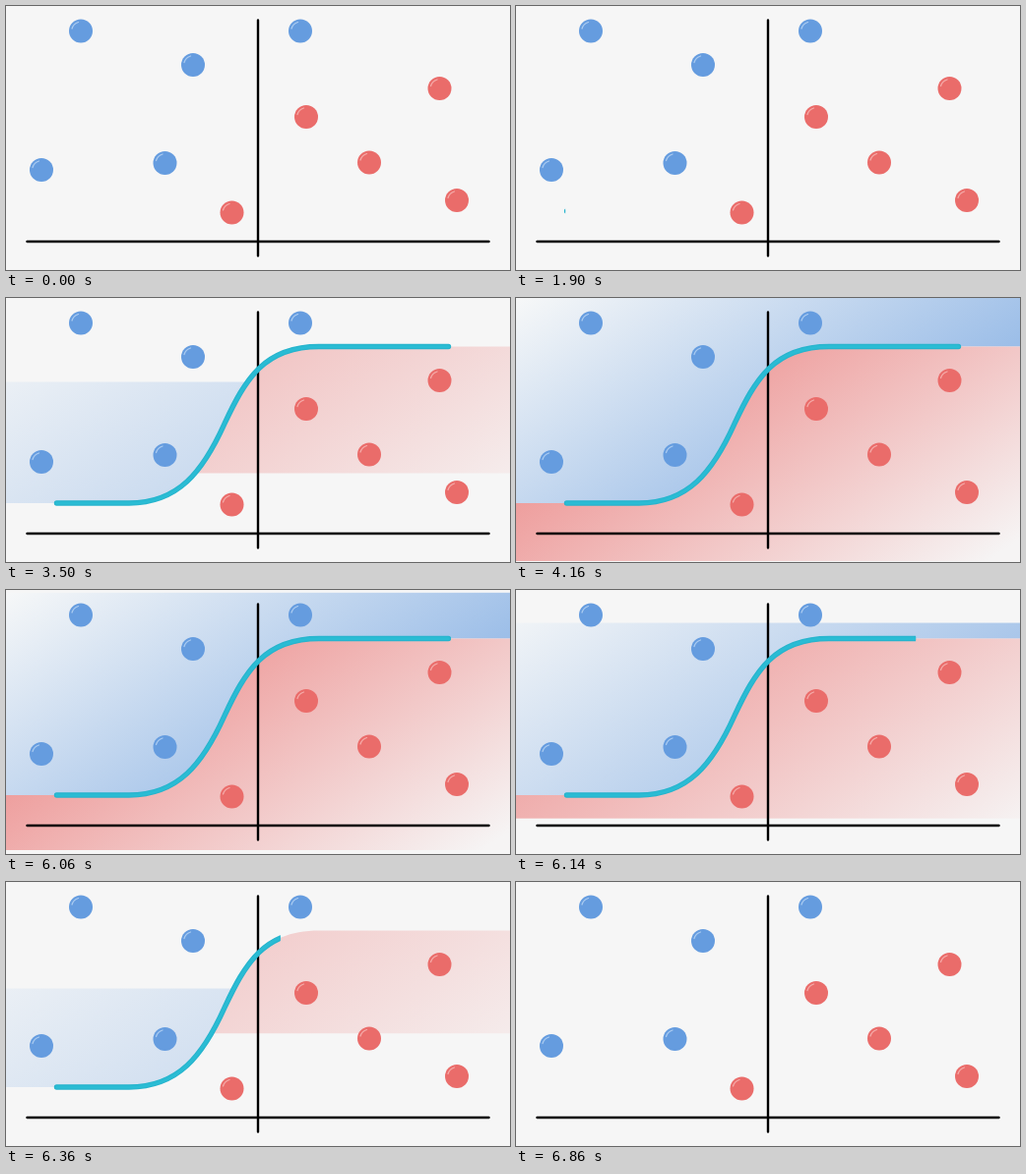
Animation, 512 px wide and 269 px high, one loop 9380 ms. Source, as an HTML page:

```html
<!DOCTYPE html>
<html lang="en">
<head>
<meta charset="utf-8">
<title>Decision boundary</title>
<style>
html, body { margin: 0; width: 100%; height: 100%; overflow: hidden; background: #f6f6f6; }
svg { display: block; width: 100%; height: 100%; }
</style>
</head>
<body>
<svg viewBox="0 0 512 269">
  <defs>
    <linearGradient id="blueFill" gradientUnits="userSpaceOnUse" x1="0" y1="0" x2="176" y2="266">
      <stop offset="0" stop-color="#f7f8f8"/>
      <stop offset="1" stop-color="#9cbee8"/>
    </linearGradient>
    <linearGradient id="redFill" gradientUnits="userSpaceOnUse" x1="93.5" y1="141" x2="270" y2="407">
      <stop offset="0" stop-color="#ee9d9c"/>
      <stop offset="1" stop-color="#f6f4f4"/>
    </linearGradient>
    <clipPath id="blueClip"><rect id="blueWipe" width="512"/></clipPath>
    <clipPath id="redClip"><rect id="redWipe" y="49" width="512"/></clipPath>
    <clipPath id="lineClip"><rect id="lineWipe" x="48" y="40" height="180"/></clipPath>
  </defs>
  <rect width="512" height="269" fill="#f6f6f6"/>
  <g clip-path="url(#blueClip)"><path id="blue" fill="url(#blueFill)"/></g>
  <g clip-path="url(#redClip)"><path id="red" fill="url(#redFill)"/></g>
  <path d="M256 14.5V254.5M21.5 240H490.5" stroke="#000" stroke-width="2.4" stroke-linecap="round"/>
  <g clip-path="url(#lineClip)" fill="none" stroke-linecap="round">
    <path class="line" stroke="#27b4cd" stroke-width="5.4"/>
    <path class="line" stroke="#2abcd4" stroke-width="3"/>
  </g>
  <g id="dots"></g>
</svg>
<script>
const LOOP = 9380, TOP = 49.5, LOW = 209, FLOOR = 268;
const LEFT = 48, RIGHT = 453;
const $ = id => document.getElementById(id);

// Sigmoid boundary, shared by the line and both areas
const bend = `H125C175 ${LOW} 200 177 222 128C243 83 262 ${TOP} 318 ${TOP}`;
for (const p of document.querySelectorAll('.line')) {
  p.setAttribute('d', `M51.5 ${LOW}${bend}H449.5`);
}
$('blue').setAttribute('d', `M0 0V${LOW}${bend}H512V0Z`);
$('red').setAttribute('d', `M0 ${FLOOR}V${LOW}${bend}H512V${FLOOR}Z`);

const dot = (color, shine) => ([x, y]) =>
  `<g transform="translate(${x} ${y})"><circle r="12" fill="${color}"/>` +
  `<path d="M-9 -2.5Q-7.5 -7.5 -2.5 -9" fill="none" stroke="${shine}" stroke-width="1.3" stroke-linecap="round"/></g>`;
const blues = [[76, 25.5], [190, 60], [36, 167], [161.5, 160], [299, 25.5]];
const reds = [[440.5, 84], [305, 113], [369, 159.5], [458, 198], [229.5, 210.5]];
$('dots').innerHTML = blues.map(dot('#659cdf', '#a9caf0')).join('') +
  reds.map(dot('#ea6c6a', '#f5aaa8')).join('');

const span = (t, start, length) => Math.min(1, Math.max(0, (t - start) / length));
const easeOut = p => 1 - Math.pow(1 - p, 1.56);

function draw(t) {
  const line = span(t, 1897, 760) - span(t, 6060, 700);
  $('lineWipe').setAttribute('width', (RIGHT - LEFT) * line);

  // Areas grow out of the boundary while fading in, and leave the same way
  const area = easeOut(span(t, 3095, 930)) - easeOut(span(t, 6054, 820));
  $('blueWipe').setAttribute('y', LOW * (1 - area));
  $('blueWipe').setAttribute('height', LOW * area);
  $('redWipe').setAttribute('height', (FLOOR - 49) * area);
  $('blue').setAttribute('opacity', area);
  $('red').setAttribute('opacity', area);
}

const begin = performance.now();
function tick() {
  draw((performance.now() - begin) % LOOP);
  requestAnimationFrame(tick);
}
draw(0);
requestAnimationFrame(tick);
</script>
</body>
</html>
```
